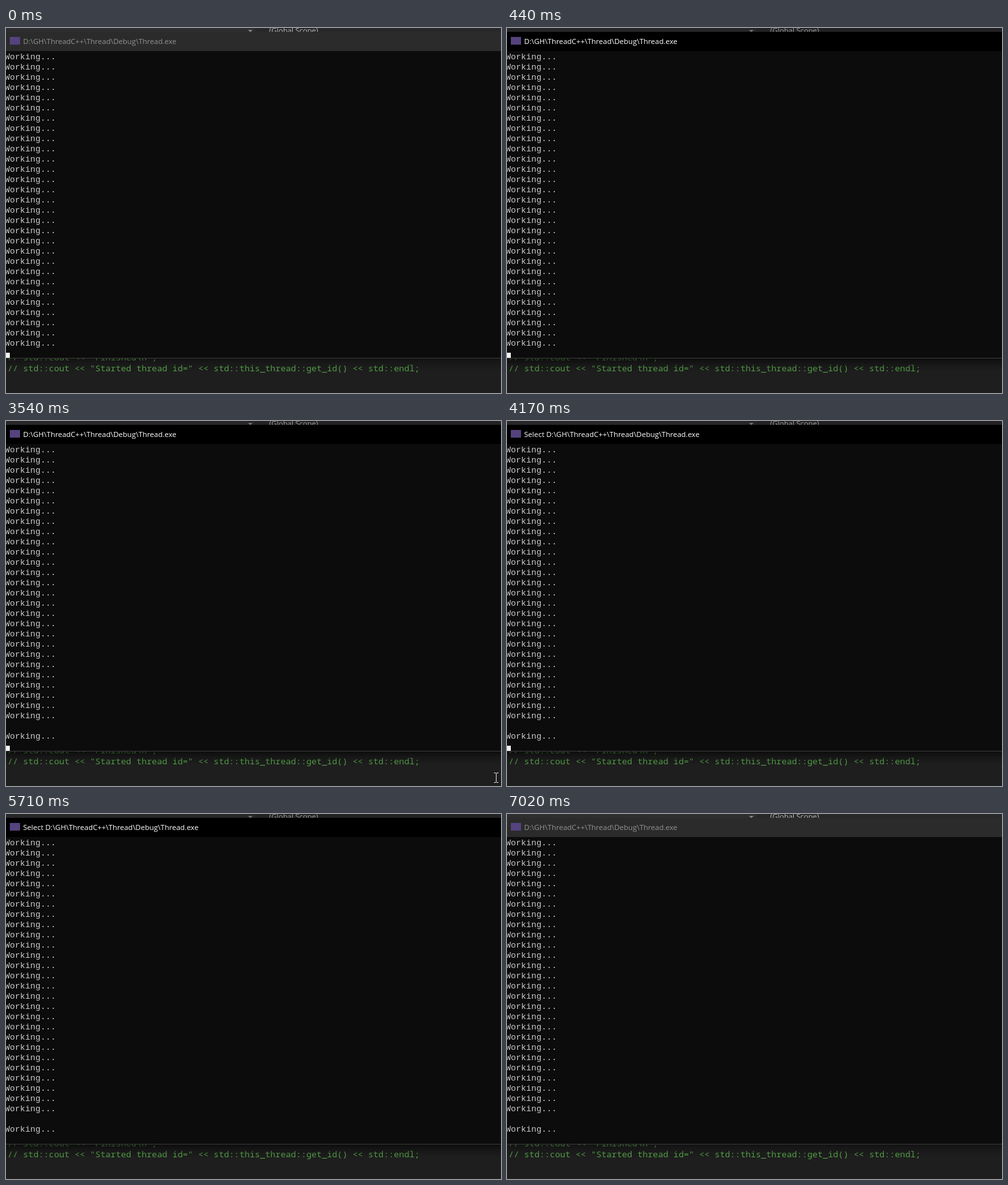
Recreate the animation shown at these times as an HTML page. Size 775 px wide and 571 px high, loop 7.19 s.

```html
<!DOCTYPE html>
<html lang="en">
<head>
<meta charset="utf-8">
<title>Console thread</title>
<style>
  html, body { margin: 0; width: 100%; height: 100%; overflow: hidden; background: #1e1e1e; }
  svg { display: block; width: 100vw; height: 100vh; }
  .ui { font: 11.5px "Open Sans", "Noto Sans", sans-serif; }
  .code { font: 13.44px "Noto Sans Mono", "DejaVu Sans Mono", monospace; fill: #57a64a; }
  .out { font: 13.33px "Liberation Mono", "DejaVu Sans Mono", monospace; fill: #ccc; }
</style>
</head>
<body>
<svg viewBox="0 0 775 571">
  <defs>
    <linearGradient id="fade" x1="0" y1="0" x2="0" y2="1">
      <stop offset="0" stop-color="#000"/>
      <stop offset=".45" stop-color="#000" stop-opacity=".4"/>
      <stop offset="1" stop-color="#000" stop-opacity="0"/>
    </linearGradient>
  </defs>

  <!-- editor behind the console -->
  <rect width="775" height="571" fill="#1e1e1e"/>
  <rect width="775" height="8" fill="#2d2d30"/>
  <rect width="390" height="8" fill="#333337"/>
  <rect x="390" width="2" height="8" fill="#2d2d30"/>
  <path d="M379 3h7l-3.5 3.5z" fill="#999"/>
  <text class="ui" x="412" y="8" fill="#d0d0d0">(Global Scope)</text>
  <text class="code" x="2.6" y="520">// std::cout &lt;&lt; "Finished\n";</text>
  <text class="code" x="2.6" y="537">// std::cout &lt;&lt; "Started thread id=" &lt;&lt; std::this_thread::get_id() &lt;&lt; std::endl;</text>
  <rect id="topShade" width="775" height="6"/>
  <rect id="lowShade" y="516" width="775" height="22" fill="url(#fade)"/>

  <!-- console window -->
  <rect id="bar" y="6" width="775" height="30"/>
  <rect x="6" y="14" width="16" height="12" fill="#54437d"/>
  <text id="title" class="ui" x="26.8" y="25"></text>
  <rect y="36" width="775" height="480" fill="#0c0c0c"/>
  <rect y="516" width="775" height="1" fill="#3a3a3a"/>
  <g id="lines" class="out"></g>
  <rect id="caret" y="508" width="6" height="8" fill="#f3f3f3"/>
  <path id="beam" d="M0 0h3v1h-3zM4 0h3v1h-3zM3 1h1v14h-1zM0 15h3v1h-3zM4 15h3v1h-3z" fill="#e0e0e0"/>
</svg>
<script>
const LOOP = 7190, ROWS = 29, GAP_ROW = 27;
const PATH = 'D:\\GH\\ThreadC++\\Thread\\Debug\\Thread.exe';
const $ = id => document.getElementById(id);

// Times at which each state flips
const caretFlips = [1140, 1220, 2610, 3070, 3620, 4170, 4710, 5170, 5710, 6270, 6800];
const selectFlips = [3850, 4480, 5320, 6010];
const focusFlips = [440, 7020];

// Mouse pointer sightings: from, to, x, y
const sightings = [
  [70, 130, 737, 540],
  [2380, 2460, 761, 554],
  [2460, 2540, 761, 562],
  [3540, 3620, 764, 550],
  [6650, 6720, 765, 556],
  [6720, 6800, 770, 563]
];

const flipped = (times, t) => times.filter(x => t >= x).length % 2 === 1;
const show = (el, on) => el.setAttribute('visibility', on ? 'visible' : 'hidden');

const rows = Array.from({ length: ROWS }, (_, i) => {
  const row = document.createElementNS($('lines').namespaceURI, 'text');
  row.setAttribute('x', -2);
  row.setAttribute('y', 49 + 16 * i);
  row.textContent = 'Working...';
  return $('lines').appendChild(row);
});

function render(t) {
  const active = flipped(focusFlips, t);
  $('bar').setAttribute('fill', active ? '#000' : '#2b2b2b');
  $('topShade').setAttribute('opacity', active ? .25 : .1);
  $('lowShade').setAttribute('opacity', active ? .6 : .4);
  $('title').setAttribute('fill', active ? '#fff' : '#929292');
  $('title').textContent = (flipped(selectFlips, t) ? 'Select ' : '') + PATH;

  show(rows[GAP_ROW], t < 1540);
  show($('caret'), !flipped(caretFlips, t));

  const spot = sightings.find(([from, to]) => t >= from && t < to);
  show($('beam'), spot);
  if (spot) $('beam').setAttribute('transform', `translate(${spot[2]} ${spot[3]})`);
}

const start = performance.now();
function tick() {
  render((performance.now() - start) % LOOP);
  requestAnimationFrame(tick);
}
tick();
</script>
</body>
</html>
```
